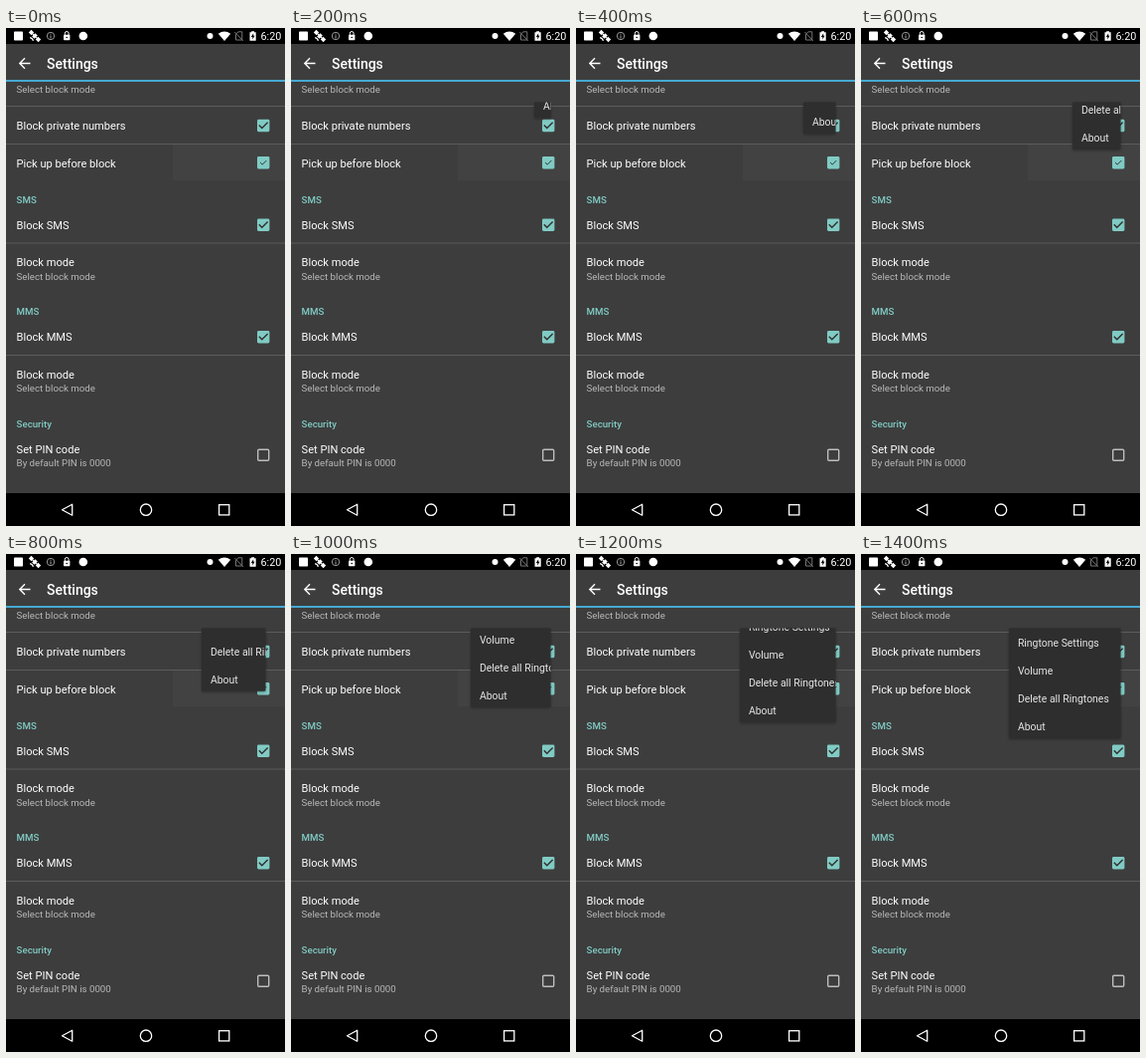
These frames come from a looping animation (281x500 px, 1600 ms). An HTML page:

```html
<!DOCTYPE html>
<html lang="en">
<head>
<meta charset="utf-8">
<title>Settings menu</title>
<style>
html, body { margin: 0; width: 100%; height: 100%; overflow: hidden; background: #000; }
svg { display: block; }
text { font-family: Roboto, sans-serif; white-space: pre; }
.title { font-size: 11.08px; fill: #fff; }
.note { font-size: 9.7px; fill: #b8b8b8; }
.head { font-size: 9.7px; font-weight: 500; fill: #80cbc4; }
.item { font-size: 10.45px; fill: #e6e6e6; }
.line { fill: none; stroke: #fff; }
.dim { stroke: #777; }
.soft { stroke: #bbb; }
</style>
</head>
<body>
<svg id="stage" width="281" height="500" viewBox="0 0 281 500">
  <defs>
    <clipPath id="clip"><rect id="hole" y="74.5" /></clipPath>
    <filter id="shade" x="-20%" y="-20%" width="140%" height="140%">
      <feDropShadow dx="0" dy="1" stdDeviation="1.5" flood-opacity=".35" />
    </filter>
  </defs>
  <rect width="281" height="500" fill="#000" />
  <rect y="16" width="281" height="451" fill="#3d3d3d" />
  <rect x="168" y="117" width="113" height="36" fill="#424242" />

  <!-- status bar -->
  <g fill="#fff">
    <rect x="8" y="3.5" width="9" height="9" rx=".8" />
    <g transform="translate(29 8) rotate(45) scale(1.15)">
      <rect x="-1.5" y="-2" width="3" height="4" />
      <rect x="-6" y="-1.6" width="3.4" height="3.2" />
      <rect x="2.6" y="-1.6" width="3.4" height="3.2" />
      <path class="line" d="M-3 0H3M-2 4Q0 2.6 2 4" />
    </g>
    <circle class="line soft" cx="45" cy="8" r="3.7" stroke-width=".8" />
    <path class="line soft" d="M45 5.7v1M45 7.5v3" stroke-width=".9" />
    <rect x="58" y="6.8" width="6.4" height="5.4" rx=".7" />
    <path class="line" d="M59.3 7V5.4a1.9 1.9 0 0 1 3.8 0V7" />
    <circle cx="61.2" cy="9.5" r=".8" fill="#000" />
    <circle cx="77.8" cy="8" r="4.3" />
    <circle cx="205.5" cy="8" r="3" />
    <path d="M213.8 5.7Q220 1.2 226.2 5.7L220 13Z" />
    <path class="line dim" d="M231.5 6.2L234 3.8H237.8V12H231.5ZM230.4 4L238.8 12.8" />
    <path d="M245.5 4.3H247.2V3.2H250V4.3H251.7V12.8H245.5Z" />
    <path d="M249.2 5.3L246.8 9H248.3V11.6L250.5 7.8H249.2Z" fill="#000" />
    <text x="256.5" y="12" font-size="10.8">6:20</text>
  </g>

  <!-- app bar -->
  <path class="line" d="M24.5 35.5H14M19 30.3L13.8 35.5L19 40.7" stroke-width="1.4" />
  <text x="41" y="41" font-size="14" font-weight="500" fill="#fff">Settings</text>
  <rect y="52" width="281" height="2" fill="#45a9d3" />

  <g id="rows"></g>

  <g id="menu">
    <rect id="panel" y="74.5" rx="1" fill="#2e2e2e" filter="url(#shade)" />
    <g clip-path="url(#clip)"><g id="items"></g></g>
  </g>

  <!-- navigation bar -->
  <g class="line" stroke-width="1.3">
    <path d="M66.7 478.2V489.2L56.5 483.7Z" stroke-linejoin="round" />
    <circle cx="141" cy="483.7" r="5.7" />
    <rect x="214.6" y="478.7" width="10.2" height="10.2" />
  </g>
</svg>
<script>
const $ = id => document.getElementById(id);

function add(parent, tag, attrs, label = "") {
  const el = document.createElementNS("http://www.w3.org/2000/svg", tag);
  for (const key in attrs) el.setAttribute(key, attrs[key]);
  el.textContent = label;
  return parent.appendChild(el);
}

const rows = $("rows");

const lines = [
  ["note", 65, "Select block mode"],
  ["title", 102, "Block private numbers"],
  ["title", 140, "Pick up before block"],
  ["head", 176, "SMS"],
  ["title", 202, "Block SMS"],
  ["title", 239, "Block mode"],
  ["note", 253, "Select block mode"],
  ["head", 288, "MMS"],
  ["title", 314, "Block MMS"],
  ["title", 352, "Block mode"],
  ["note", 365, "Select block mode"],
  ["head", 401, "Security"],
  ["title", 427, "Set PIN code"],
  ["note", 440, "By default PIN is 0000"]
];
for (const [kind, y, label] of lines) add(rows, "text", { class: kind, x: 10.6, y }, label);

for (const y of [78, 116, 215.5, 328])
  add(rows, "rect", { y, width: 281, height: 1, fill: "#5c5c5c" });

function checkbox(y, size) {
  const g = add(rows, "g", { transform: `translate(259.2 ${y})` });
  add(g, "rect", { x: -6.2, y: -6.2, width: 12.4, height: 12.4, rx: 1.4, fill: "#80cbc4" });
  add(g, "path", {
    d: "M-4.4 -.4L-1.4 2.6L4.4 -3.2", fill: "none", stroke: "#303030",
    "stroke-width": 1.4, transform: `scale(${size})`
  });
}
[[98, 1], [135.3, 0.7], [197.7, 1], [310.2, 1]].forEach(([y, size]) => checkbox(y, size));
add(rows, "rect", {
  x: 253.7, y: 423.2, width: 11, height: 11, rx: 1,
  fill: "none", stroke: "#bdbdbd", "stroke-width": 1.4
});

const TOP = 74.5, RIGHT = 261.5, GAP = 28;
["Ringtone Settings", "Volume", "Delete all Ringtones", "About"].forEach((label, i) =>
  add($("items"), "text", { class: "item", x: 8.9, y: (i - 3) * GAP - 8 }, label));

// The menu grows from its top right corner in even steps.
const LOOP = 1600, STEP = 200;
function draw(now) {
  const n = Math.floor((now % LOOP) / STEP);
  const left = 261 - 16 * n;
  const height = 15.8 * n;
  $("menu").style.display = n ? "" : "none";
  for (const box of [$("panel"), $("hole")]) {
    box.setAttribute("x", left);
    box.setAttribute("width", RIGHT - left);
    box.setAttribute("height", height);
  }
  $("items").setAttribute("transform", `translate(${left} ${TOP + height})`);
}

function tick() {
  draw(performance.now());
  requestAnimationFrame(tick);
}
tick();
</script>
</body>
</html>
```
